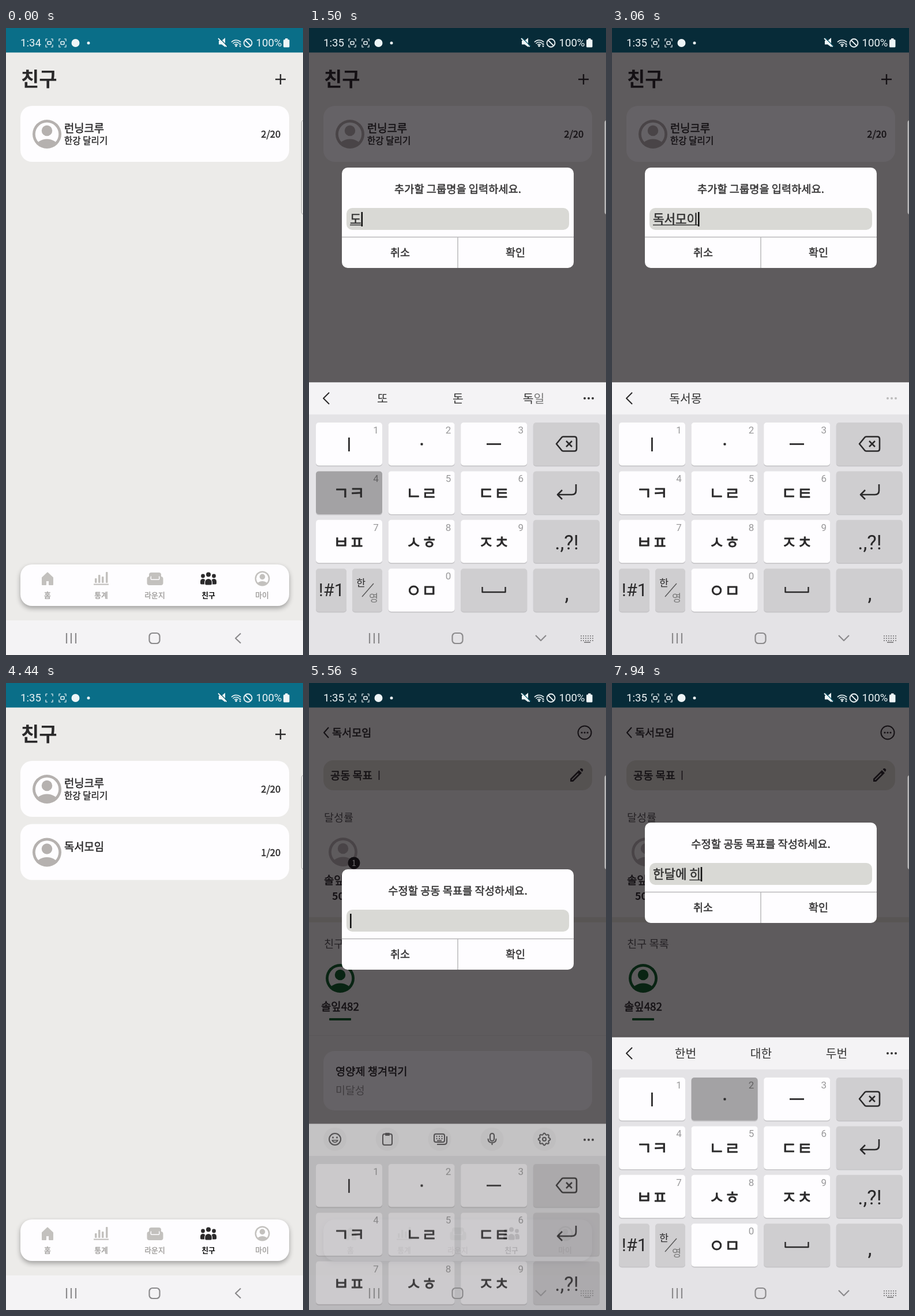
Animation of 515x1087 px, one loop 8 s. Source, as an HTML page with a canvas:

```html
<!DOCTYPE html>
<html lang="ko">
<head>
<meta charset="utf-8">
<style>
html, body { margin: 0; width: 100%; height: 100%; overflow: hidden; background: #ecebe9; }
canvas { display: block; width: 515px; height: 1087px; }
</style>
</head>
<body>
<canvas id="stage"></canvas>
<script>
const W = 515, H = 1087, LOOP = 8000, KB_TOP = 614.5;
const KR = '"Noto Sans CJK KR", "Noto Sans CJK", "Noto Sans CJK JP", sans-serif';
const LATIN = 'Roboto, sans-serif';
const INK = '#2b2a2b', WHITE = '#fefdff', PAGE = '#ecebe9', GREY = '#b5b1af', GREEN = '#0f5c29';
const MEMBER = '솔잎482';
const PRESS = 85, TEXT_LAG = 70, HINT_LAG = 150;

const dpr = window.devicePixelRatio || 1;
function setup(canvas) {
  canvas.width = W * dpr;
  canvas.height = H * dpr;
  const c = canvas.getContext('2d');
  c.scale(dpr, dpr);
  return c;
}
const main = setup(document.getElementById('stage'));
const kbCanvas = document.createElement('canvas');
const kbLayer = setup(kbCanvas);
let g = main;

// Each stroke: press time, key, resulting text, suggestions
const sessions = [
  { open: 400, kb: 620, close: 3450, title: '추가할 그룹명을 입력하세요.', strokes: [
    [1000, 'd', 'ㄷ', ['도', '다', '더']],
    [1180, 'dot', 'ㄷㆍ'],
    [1330, 'eu', '도', ['또', '돈', '독|일']],
    [1460, 'g', '독', ['독일', '독서', '독감']],
    [1590, 's', '독ㅅ', ['독서', '독수리', '독신']],
    [1880, 'dot', '독ㅅㆍ'],
    [2150, 'i', '독서', ['독서', '독서실', '독서대']],
    [2500, 'o', '독성', ['독성', '독서', '독성이']],
    [2600, 'o', '독섬', ['독섬']],
    [2700, 'dot', '독서ㅁㆍ'],
    [2790, 'eu', '독서모', ['독서모']],
    [2880, 'o', '독서몽', ['독서몽']],
    [2970, 'i', '독서모이', ['독서모이']],
    [3090, 'o', '독서모잉'],
    [3180, 'o', '독서모임', ['독서모임']]
  ] },
  { open: 5200, kb: 5440, close: 1e6, title: '수정할 공동 목표를 작성하세요.', strokes: [
    [5800, 's', 'ㅅ', ['사', '수', '시']],
    [5920, 's', 'ㅎ', ['하', '한', '해']],
    [6080, 'i', '히', ['히', '힘', '힌트']],
    [6220, 'dot', '하', ['하', '하루', '하나']],
    [6340, 'n', '한', ['한강', '한국', '한국|어']],
    [6580, 'd', '한ㄷ'],
    [6680, 'i', '한디'],
    [6770, 'dot', '한다', ['한다', '한다면', '한다는']],
    [6860, 'n', '한단', ['한단', '한단계', '한다']],
    [6940, 'n', '한달', ['한달', '한달에', '한달간']],
    [7030, 'o', '한달ㅇ'],
    [7120, 'dot', '한달ㅇㆍ'],
    [7200, 'i', '한달어'],
    [7280, 'i', '한달에', ['한달에', '한달', '한달에는']],
    [7400, 'space', '한달에 ', ['한번', '대한', '두번']],
    [7540, 's', '한달에 ㅅ'],
    [7650, 's', '한달에 ㅎ'],
    [7760, 'i', '한달에 히'],
    [7910, 'dot', '한달에 하']
  ] }
];

const ramp = (t, a, b) => Math.min(1, Math.max(0, (t - a) / (b - a)));
const easeOut = u => 1 - (1 - u) * (1 - u);

function box(x, y, w, h, r, fill, stroke, lw = 2) {
  g.beginPath();
  g.roundRect(x, y, w, h, r);
  if (fill) { g.fillStyle = fill; g.fill(); }
  if (stroke) { g.strokeStyle = stroke; g.lineWidth = lw; g.stroke(); }
}
function disc(x, y, r, fill, stroke, lw = 2) {
  box(x - r, y - r, 2 * r, 2 * r, r, fill, stroke, lw);
}
function line(color, lw, ...p) {
  g.beginPath();
  for (let i = 0; i < p.length; i += 2) g.lineTo(p[i], p[i + 1]);
  g.strokeStyle = color;
  g.lineWidth = lw;
  g.stroke();
}
function shape(d, x, y, fill, stroke, lw = 2) {
  const path = new Path2D(d);
  g.save();
  g.translate(x, y);
  g.lineJoin = 'round';
  if (fill) { g.fillStyle = fill; g.fill(path); }
  if (stroke) { g.strokeStyle = stroke; g.lineWidth = lw; g.stroke(path); }
  g.restore();
}
// weight: 400, 500 (regular, thickened) or 700
function text(s, x, cy, size, { color = INK, weight = 400, align = 'left', font = KR } = {}) {
  g.font = `${weight === 700 ? 700 : 400} ${size}px ${font}`;
  g.textAlign = align;
  g.fillStyle = color;
  const y = cy + size * (font === KR ? 0.38 : 0.355);
  g.fillText(s, x, y);
  if (weight === 500) {
    g.strokeStyle = color;
    g.lineWidth = size * 0.028;
    g.lineJoin = 'round';
    g.strokeText(s, x, y);
  }
}

function avatar(x, y, r, color, back) {
  disc(x, y, r, color);
  disc(x, y, r * 0.81, back);
  disc(x, y - r * 0.24, r * 0.37, color);
  g.save();
  g.beginPath();
  g.arc(x, y, r * 0.85, 0, 7);
  g.clip();
  g.beginPath();
  g.ellipse(x, y + r * 0.86, r * 0.74, r * 0.52, 0, 0, 7);
  g.fillStyle = color;
  g.fill();
  g.restore();
}

function groupCard(y, name, note, count) {
  box(25, y, 466, 97, 20, WHITE);
  avatar(71, y + 49, 25, GREY, WHITE);
  text(name, 101, y + 39, 18.8, { weight: 500 });
  if (note) text(note, 101, y + 60, 15.6, { weight: 500 });
  text(count, 476, y + 49, 16.4, { weight: 500, align: 'right' });
}

function listPage(t) {
  text('친구', 26, 88, 34, { weight: 700 });
  line(INK, 2.4, 467, 89, 485, 89);
  line(INK, 2.4, 476, 80, 476, 98);
  groupCard(135, '런닝크루', '한강 달리기', '2/20');
  if (t > 3900) groupCard(244.5, '독서모임', '', '1/20');
}

function groupPage() {
  const mid = { weight: 500, align: 'center' };
  line(INK, 2, 34, 77, 26, 86, 34, 95);
  text('독서모임', 40, 86, 18.6, { weight: 500 });
  disc(478, 86, 11.5, null, INK, 2);
  for (const dx of [-5, 0, 5]) disc(478 + dx, 86, 1.6, INK);
  box(25, 134, 466, 52, 17, '#d5d4ca');
  text('공동 목표', 37, 160, 18.7, { weight: 500 });
  line(INK, 1.5, 121.5, 152, 121.5, 168);
  shape('M-11 11v-5L4 -9l5 5L-6 11zM5.5 -10.5l2-1.5q1.5-.5 3 1t.5 3l-1.5 2z', 464, 160, INK);
  line('#d5d4ca', 1.6, 456, 168, 467, 157);

  text('달성률', 26, 233, 18.5, { color: '#555' });
  avatar(59, 293, 25, GREY, PAGE);
  disc(78, 312, 10.5, '#222');
  text('1', 78, 312, 12.5, { color: '#fff', align: 'center', weight: 500 });
  text(MEMBER, 59, 342, 18.8, mid);
  text('50%', 59, 369, 17.7, { weight: 700, align: 'center' });
  box(0, 406, W, 9, 0, '#dddcd2');

  text('친구 목록', 26, 452, 18.6, { color: '#555' });
  avatar(54, 512, 25, GREEN, PAGE);
  text(MEMBER, 54, 561, 18.8, mid);
  box(35, 581, 38, 4, 1, GREEN);
  box(0, 610.5, W, 1.5, 0, '#e2e1de');
  box(25, 638, 466, 103, 19, WHITE);
  text('영양제 챙겨먹기', 46, 673, 18.7, { weight: 500 });
  text('미달성', 46, 706, 18.4, { color: '#999' });
}

function tabBar() {
  const c = '#c3c1be';
  g.save();
  g.shadowColor = 'rgba(0,0,0,.32)';
  g.shadowBlur = 8 * dpr;
  g.shadowOffsetY = 4 * dpr;
  box(25, 930, 466, 72, 20, WHITE);
  g.restore();
  shape('M-9 -2L0 -10.5L9 -2V10H3V3H-3V10H-9Z', 72, 955, c, c, 2);
  [[154, 954], [160, 948], [166, 951], [173, 943]].forEach(([x, y]) => box(x, y, 3.5, 962 - y, 1, c));
  box(152, 963.5, 26, 2.2, 0, c);
  box(248, 944, 21, 14, 4, c);
  box(244.5, 951, 28, 15, 4, c);
  box(250.5, 950, 16, 7, 2, WHITE);
  box(252, 949, 13, 6.5, 0, c);
  for (const dx of [-9.5, 9.5]) {
    disc(351 + dx, 950, 3.4, INK);
    box(346.5 + dx, 955, 9, 9.5, [5, 5, 2, 2], INK);
  }
  disc(351, 948, 5, WHITE);
  disc(351, 947.5, 4, INK);
  box(344, 954, 14, 12, [7, 7, 2, 2], WHITE);
  box(345.2, 955, 11.6, 10.5, [6, 6, 2, 2], INK);
  avatar(444.5, 954.5, 13, c, WHITE);
  ['홈', '통계', '라운지', '친구', '마이'].forEach((s, i) => {
    const on = i === 3;
    text(s, 72 + 93 * i, 983, 12.8,
      { align: 'center', weight: on ? 700 : 500, color: on ? '#111' : '#9d9b99' });
  });
}

function statusBar(t) {
  const c = '#eef5f7';
  text(t < 450 ? '1:34' : '1:35', 25, 25.5, 18.6, { color: c, font: LATIN });
  const blink = t % 1020 > 150 && t % 1020 < 430;
  [75, 98].forEach((x, i) => {
    shape('M-6 -3v-4h3M6 -3v-4h-3M-6 3v4h3M6 3v4h-3', x, 26, null, c, 1.2);
    if (i || !blink) box(x - 3, 23.5, 6, 5, 1, null, c, 1.5);
  });
  disc(120.5, 26, 7, c);
  disc(143, 26, 2.5, c);
  shape('M-7 -3.5h5l6 -5v16l-6 -4.5h-5z', 376, 25.5, c);
  line('#0a5c70', 1.2, 370, 17.5, 384.5, 32);
  line(c, 1.8, 368, 18, 382.5, 32.5);
  for (const r of [4, 7.5, 11]) {
    g.beginPath();
    g.arc(399, 32, r, -2.4, -0.74);
    g.strokeStyle = c;
    g.lineWidth = 1.6;
    g.stroke();
  }
  disc(399, 31, 1.8, c);
  shape('M-2 0L0 -3L2 0ZM-2 1.5L0 4.5L2 1.5Z', 406, 29, c);
  disc(419.5, 26, 7, null, c, 1.8);
  line(c, 1.8, 414.5, 21, 424.5, 31);
  text('100%', 433.5, 25.5, 18.6, { color: c, font: LATIN });
  box(481, 20, 10.5, 13.5, 1.5, c);
  box(484, 18, 4.5, 3, 0.5, c);
}

function systemNav(withKeyboard) {
  const c = '#8b8a8c';
  for (const x of [105, 113, 121]) line(c, 2.2, x, 1049, x, 1067);
  box(248.5, 1049, 18, 18, 5.5, null, c, 2.2);
  if (withKeyboard) {
    line(c, 2.2, 393, 1053, 402, 1062, 411, 1053);
    for (let i = 0; i < 18; i++) box(471 + (i % 6) * 4, 1053 + Math.floor(i / 6) * 4, 2, 2, 0, c);
    box(477, 1064, 11, 2, 0, c);
  } else {
    line(c, 2.2, 407, 1049.5, 398, 1058, 407, 1066.5);
  }
}

function toolbar() {
  const y = 641, c = '#4a494b';
  for (let i = 0; i < 5; i++) disc(45 + 90.8 * i, y, 20, '#ececee');
  disc(45, y, 10, null, c);
  disc(41.5, y - 3, 1.5, c);
  disc(48.5, y - 3, 1.5, c);
  shape('M-5 2Q0 9 5 2Z', 45, y, null, c, 1.6);
  box(128, y - 9, 16, 19, 3, null, c);
  box(132, y - 11, 8, 5, 1, c);
  box(217, y - 9, 18, 14, 3, null, c);
  shape('M-6 9H6Q11 9 11 4V-5', 228, y, null, c);
  for (let i = 0; i < 6; i++) box(220.5 + (i % 3) * 4.5, y - 6 + Math.floor(i / 3) * 4, 2, 2, 0, c);
  box(222, y + 1.5, 8, 1.8, 0, c);
  box(314, y - 10, 7, 13, 3.5, null, c);
  shape('M-7 -1Q-7 6 0 6T7 -1M0 6V10', 317.5, y, null, c);
  g.beginPath();
  for (let a = 0; a < 6.28; a += 0.06) {
    const r = 9.2 + 1.2 * Math.cos(8 * a);
    g.lineTo(408 + r * Math.cos(a), y + r * Math.sin(a));
  }
  g.closePath();
  g.strokeStyle = c;
  g.lineWidth = 2;
  g.stroke();
  disc(408, y, 3, null, c);
}

function hints(list) {
  line(INK, 2, 35, 632, 25, 642, 35, 652);
  list.forEach((s, i) => {
    const [head, tail = ''] = s.split('|');
    g.font = `400 20.4px ${KR}`;
    const x = 127.5 + 131 * i - g.measureText(head + tail).width / 2;
    const w = g.measureText(head).width;
    text(head, x, 642, 20.4, { color: '#333' });
    if (tail) text(tail, x + w, 642, 20.4, { color: '#777' });
  });
}

const KEYS = [
  ['i', ''], ['dot', ''], ['eu', ''], ['del', ''],
  ['g', 'ㄱㅋ'], ['n', 'ㄴㄹ'], ['d', 'ㄷㅌ'], ['enter', ''],
  ['b', 'ㅂㅍ'], ['s', 'ㅅㅎ'], ['j', 'ㅈㅊ'], ['punct', ''],
  ['sym', ''], ['o', 'ㅇㅁ'], ['space', ''], ['comma', '']
];

function keyCap(x, y, w, special, down) {
  box(x, y + 1.2, w, 75, 5, '#c6c5c8');
  box(x, y, w, 74.5, 5, down ? '#a3a2a4' : special ? '#cfced0' : WHITE);
}

function keyboard(pressed, list) {
  g = kbLayer;
  g.clearRect(0, 0, W, H);
  box(0, KB_TOP, W, H - KB_TOP, 0, '#e4e3e6');
  box(0, KB_TOP, W, 55.5, 0, '#f4f3f5');
  if (list) hints(list); else toolbar();
  const dots = list && list.length === 1 ? '#bbb' : '#333';
  for (const dx of [-7, 0, 7]) disc(485 + dx, 642, 2, dots);

  KEYS.forEach(([id, label], i) => {
    const col = i % 4, row = Math.floor(i / 4);
    const x = 12 + 125.6 * col, y = 684 + 84.4 * row;
    if (id === 'sym') {
      keyCap(x, y, 53, true);
      keyCap(75, y, 52, true);
      return;
    }
    keyCap(x, y, 115, col === 3 || id === 'space', id === pressed);
    if (label) text(label, x + 57.5, y + 37.5, 29.5, { align: 'center', weight: 500 });
    if (col < 3 && id !== 'space') {
      const n = row === 3 ? 0 : row * 3 + col + 1;
      text(n, x + 104, y + 13, 17, { align: 'center', color: 'rgba(0,0,0,.4)', font: LATIN });
    }
  });

  const latin = { align: 'center', font: LATIN };
  box(68, 710, 2.8, 24, 0, INK);
  box(193.5, 719.5, 4, 4, 1, INK);
  box(308, 720, 25, 2.8, 0, INK);
  shape('M-18 0L-9 -11Q-8 -12.5 -6 -12.5H13Q17 -12.5 17 -8.5V8.5Q17 12.5 13 12.5H-6Q-8 12.5 -9 11ZM-1 -5L9 5M9 -5L-1 5', 447, 721, null, INK, 2.6);
  shape('M16 -15V-4Q16 3 9 3H-16M-8 -5L-16 3L-8 11', 447, 806, null, INK, 2.6);
  text('.,?!', 447, 892, 35, latin);
  text('!#1', 39, 974, 31, latin);
  text('한', 90, 961, 17.5, { align: 'center' });
  line('#555', 1.4, 92, 986, 112, 963);
  text('영', 112, 987, 17.5, { align: 'center', color: '#777' });
  shape('M-20 -5V4H20V-5', 320.5, 974, null, INK, 2.4);
  text(',', 447, 979, 36, latin);
  g = main;
}

function dialog(title, y, value, caret) {
  const mid = { align: 'center', weight: 500, color: '#353435' };
  box(57, y, 402, 174, 10, WHITE);
  text(title, 258, y + 36.5, 18.7, mid);
  box(65, y + 70, 386, 38, 10, '#d9d9d5');
  text(value, 71, y + 89, 21.2, { color: '#333', weight: 500 });
  const end = 71 + g.measureText(value).width;
  const start = 71 + g.measureText(value.slice(0, value.lastIndexOf(' ') + 1)).width;
  if (end > start) line('#333', 1.5, start, y + 99.5, end, y + 99.5);
  if (caret) box(end, y + 77, 2.6, 25, 0, '#111');
  line('#b9b8ba', 1.5, 57, y + 120.5, 459, y + 120.5);
  line('#b9b8ba', 1.5, 258, y + 120.5, 258, y + 174);
  text('취소', 158, y + 147, 18.5, mid);
  text('확인', 358, y + 147, 18.5, mid);
}

function typing(s, t) {
  const state = { value: '', pressed: '', list: null, last: s.open };
  for (const [at, key, value, list] of s.strokes) {
    if (t >= at && t < at + PRESS) state.pressed = key;
    if (t >= at + TEXT_LAG) { state.value = value; state.last = at; }
    if (list && t >= at + HINT_LAG) state.list = list;
  }
  return state;
}

function draw(t) {
  g = main;
  box(0, 0, W, H, 0, PAGE);
  box(0, 0, W, 42.5, 0, '#0a6e88');
  if (t < 4700) listPage(t); else groupPage();
  tabBar();
  box(0, 1027, W, 60, 0, '#f4f3f5');

  const s = sessions.find(d => t >= d.open && t < d.close + 300);
  let kb = 0;
  if (s) {
    const shown = ramp(t, s.open, s.open + 140) * (1 - ramp(t, s.close, s.close + 140));
    const moved = easeOut(ramp(t, s.kb + 160, s.kb + 250));
    const state = typing(s, t);
    kb = easeOut(ramp(t, s.kb, s.kb + 277)) * (1 - easeOut(ramp(t, s.close, s.close + 260)));
    box(0, 0, W, H, 0, `rgba(5,0,6,${0.612 * shown})`);
    g.globalAlpha = shown;
    dialog(s.title, 323 - 81 * moved, state.value, (t - state.last) % 1000 < 500);
    if (kb > 0) {
      keyboard(state.pressed, state.list);
      g.globalAlpha = kb;
      g.drawImage(kbCanvas, 0, (1 - kb) * (H - KB_TOP), W, H);
    }
    g.globalAlpha = 1;
  }
  statusBar(t);
  systemNav(kb > 0);
  box(512.5, 160, 10, 163, 4, 'rgba(245,245,245,.6)', 'rgba(140,140,140,.6)', 1.2);
}

const begin = performance.now();
function tick() {
  draw((performance.now() - begin) % LOOP);
  requestAnimationFrame(tick);
}
tick();
</script>
</body>
</html>
```
